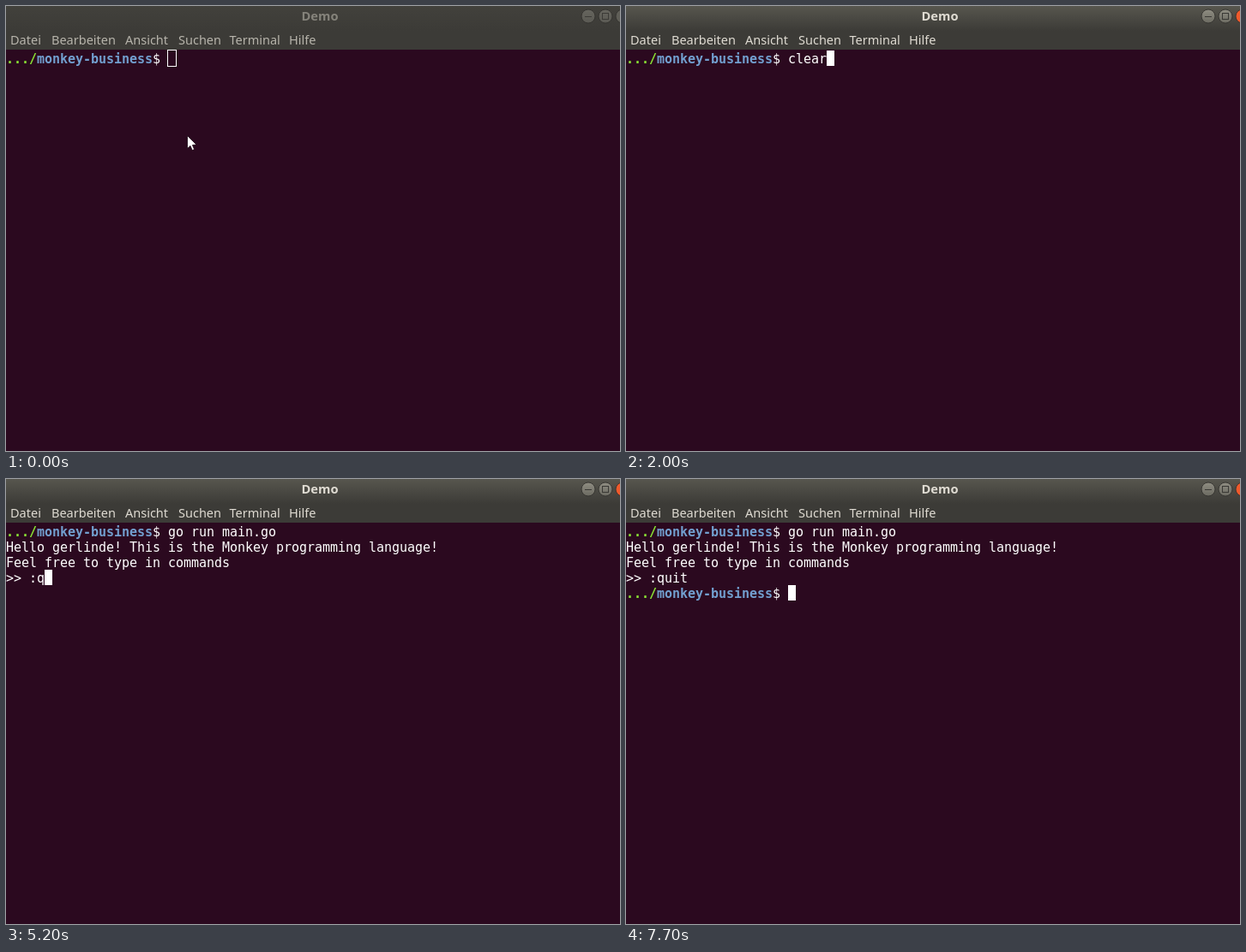
An HTML page with a canvas for the animation above (8000 ms loop, 716 by 520 pixels).

```html
<!DOCTYPE html>
<html lang="de">
<head>
<meta charset="utf-8">
<title>Demo</title>
<style>
html, body { margin: 0; width: 716px; height: 520px; overflow: hidden; background: #2b091f; }
canvas { display: block; }
</style>
</head>
<body>
<canvas id="stage" width="716" height="520"></canvas>
<script>
const ctx = document.getElementById('stage').getContext('2d');
const LOOP = 8000, CELL = 9, LINE = 18, TOP = 52, BASE = 15;
const MONO = '15px "Ubuntu Mono", "DejaVu Sans Mono", monospace'.replace('"Ubuntu Mono", ', '');
const SANS = '14.5px "Noto Sans", sans-serif';
const TITLE = 'bold 14.67px "Noto Sans", sans-serif';
const PROMPT_END = 21;
const MENU = [['Datei', 5], ['Bearbeiten', 53], ['Ansicht', 139],
  ['Suchen', 201], ['Terminal', 260.5], ['Hilfe', 330]];
const GREETING = 'Hello gerlinde! This is the Monkey programming language!';
const HINT = 'Feel free to type in commands';

const INACTIVE = { top: '#42413c', low: '#3c3b37', title: '#85837b', menu: '#b7b4ab',
  discTop: '#66655e', discLow: '#5a5953', rim: '#33322e', close: '#5f5e57', glyph: '#3c3b37' };
const ACTIVE = { top: '#57564e', low: '#3c3b37', title: '#dfdbd2', menu: '#dfdbd2',
  discTop: '#8f8d82', discLow: '#6b6a61', rim: '#33322e', close: '#ee5a2c', glyph: '#3a3935' };

function fade(y0, y1, a, b) {
  const g = ctx.createLinearGradient(0, y0, 0, y1);
  g.addColorStop(0, a);
  g.addColorStop(1, b);
  return g;
}

function button(x, fill, s) {
  ctx.beginPath();
  ctx.arc(x, 12, 8, 0, 2 * Math.PI);
  ctx.fillStyle = fill;
  ctx.fill();
  ctx.strokeStyle = s.rim;
  ctx.lineWidth = 0.9;
  ctx.stroke();
}

function header(s) {
  ctx.fillStyle = fade(0, 29, s.top, s.low);
  ctx.fillRect(0, 0, 716, 51);
  ctx.font = TITLE;
  ctx.fillStyle = s.title;
  ctx.textAlign = 'center';
  ctx.fillText('Demo', 366, 17);
  ctx.textAlign = 'left';
  ctx.font = SANS;
  ctx.fillStyle = s.menu;
  for (const [label, x] of MENU) ctx.fillText(label, x, 45);

  const disc = fade(4, 20, s.discTop, s.discLow);
  button(679, disc, s);
  button(699, disc, s);
  button(719, s.close, s);
  ctx.fillStyle = s.glyph;
  ctx.fillRect(675, 12, 8, 1);
  ctx.strokeStyle = s.glyph;
  ctx.lineWidth = 1;
  ctx.strokeRect(695.5, 8.5, 7, 7);
}

// Every glyph sits on the terminal grid.
function type(text, col, row, color = '#fff', weight = '') {
  ctx.font = weight + ' ' + MONO;
  ctx.fillStyle = color;
  [...text].forEach((c, i) => ctx.fillText(c, (col + i) * CELL, TOP + row * LINE + BASE));
}

function prompt(row, command = '') {
  type('.../', 0, row, '#8ae234', 'bold');
  type('monkey-business', 4, row, '#729fcf', 'bold');
  type('$ ' + command, 19, row);
}

function block(col, row) {
  ctx.fillStyle = '#fff';
  ctx.fillRect(col * CELL, TOP + row * LINE, CELL, LINE);
}

function arrow() {
  const pts = [[211.5, 151.5], [211.5, 166.5], [215, 163.4], [217.2, 168.6],
    [219.6, 167.6], [217.4, 162.5], [222, 162]];
  ctx.beginPath();
  pts.forEach(p => ctx.lineTo(...p));
  ctx.closePath();
  ctx.fillStyle = '#fff';
  ctx.fill();
  ctx.strokeStyle = '#1a0612';
  ctx.lineWidth = 0.8;
  ctx.stroke();
}

function beam() {
  ctx.fillStyle = '#12040d';
  ctx.fillRect(210, 146, 7, 3);
  ctx.fillRect(212, 147, 3, 13);
  ctx.fillRect(210, 158, 7, 3);
  ctx.fillStyle = '#e8e4e6';
  ctx.fillRect(211, 147, 5, 1);
  ctx.fillRect(213, 147, 1, 13);
  ctx.fillRect(211, 159, 5, 1);
}

function within(t, ...spans) {
  return spans.some(([a, b]) => t >= a && t < b);
}

function terminal(t) {
  const command = t < 2000 ? '' : t < 2500 ? 'clear' : 'go run main.go';
  prompt(0, command);

  const keys = [4900, 5200, 5400, 5500, 5600].filter(k => t >= k).length;
  if (t >= 3500) {
    type(GREETING, 0, 1);
    type(HINT, 0, 2);
    type('>> ' + ':quit'.slice(0, keys), 0, 3);
  }
  if (t >= 6800) prompt(4);

  if (t < 800) {
    ctx.strokeStyle = '#fff';
    ctx.lineWidth = 1;
    ctx.strokeRect(188.5, 51.5, 10, 19);
  } else if (!within(t, [1300, 1800], [2900, 3000], [3600, 4200], [6100, 6700], [7400, 7700])) {
    if (t < 3000) block(PROMPT_END + command.length, 0);
    else if (t < 3500) block(0, 1);
    else if (t < 6800) block(3 + keys, 3);
    else block(PROMPT_END, 4);
  }
}

function draw(t) {
  ctx.fillStyle = '#2b091f';
  ctx.fillRect(0, 0, 716, 520);
  header(INACTIVE);
  ctx.globalAlpha = t < 800 ? 0 : t < 900 ? 0.5 : 1;
  header(ACTIVE);
  ctx.globalAlpha = 1;
  terminal(t);
  if (t < 500) arrow();
  else if (t < 1800) beam();
}

const start = performance.now();
function frame() {
  draw((performance.now() - start) % LOOP);
  requestAnimationFrame(frame);
}
frame();
</script>
</body>
</html>
```
